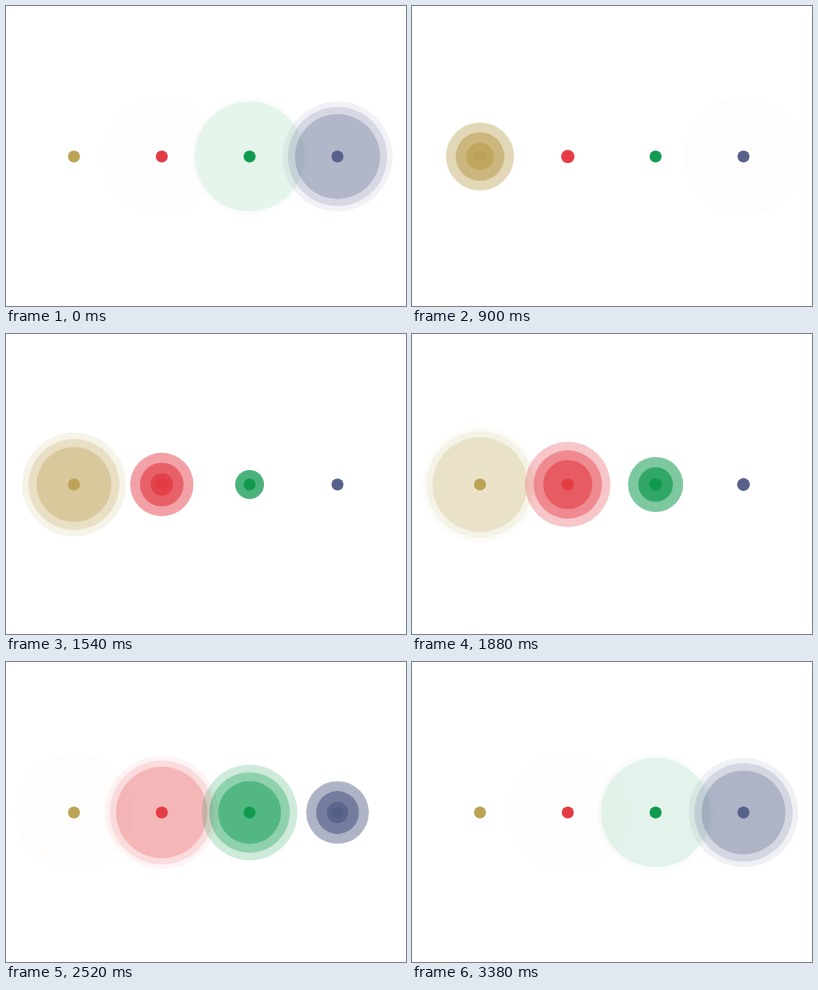
An HTML page with a canvas that plays this animation: 400x300 px, repeating every 3.4 s.

```html
<!DOCTYPE html>
<html lang="en">
<head>
<meta charset="utf-8">
<title>Pulsing dots</title>
<style>
  html, body { margin: 0; width: 100%; height: 100%; overflow: hidden; background: #fff; }
  canvas { display: block; }
</style>
</head>
<body>
<canvas id="stage" width="400" height="300"></canvas>
<script>
const ctx = document.getElementById('stage').getContext('2d');

const LOOP = 3400;
const PULSE = 2270;
const RING_DELAY = 267;
const RINGS = 3;
const MAX_RADIUS = 60;
const DOT_RADIUS = 6;
const CENTER_Y = 150.5;

const dots = [
  { x: 68, color: '#bba256', start: 30 },
  { x: 155.8, color: '#e33b45', start: 737 },
  { x: 243.6, color: '#119a50', start: 1190 },
  { x: 331.5, color: '#566089', start: 1727 }
];

const easeOutSine = u => Math.sin(u * Math.PI / 2);

function disc(x, radius, color, alpha) {
  ctx.globalAlpha = alpha;
  ctx.fillStyle = color;
  ctx.beginPath();
  ctx.arc(x, CENTER_Y, radius, 0, Math.PI * 2);
  ctx.fill();
}

function drawDot({ x, color, start }, time) {
  disc(x, DOT_RADIUS, color, 1);
  for (let i = 0; i < RINGS; i++) {
    // Rings may run past the end of the loop, so wrap their age.
    const age = (time - start - i * RING_DELAY + 2 * LOOP) % LOOP;
    if (age >= PULSE) continue;
    const grow = easeOutSine(age / PULSE);
    disc(x, MAX_RADIUS * grow, color, 1 - grow);
  }
}

function render(time) {
  ctx.globalAlpha = 1;
  ctx.fillStyle = '#fff';
  ctx.fillRect(0, 0, 400, 300);
  dots.forEach(dot => drawDot(dot, time));
}

const began = performance.now();
function tick() {
  render((performance.now() - began) % LOOP);
  requestAnimationFrame(tick);
}
tick();
</script>
</body>
</html>
```
